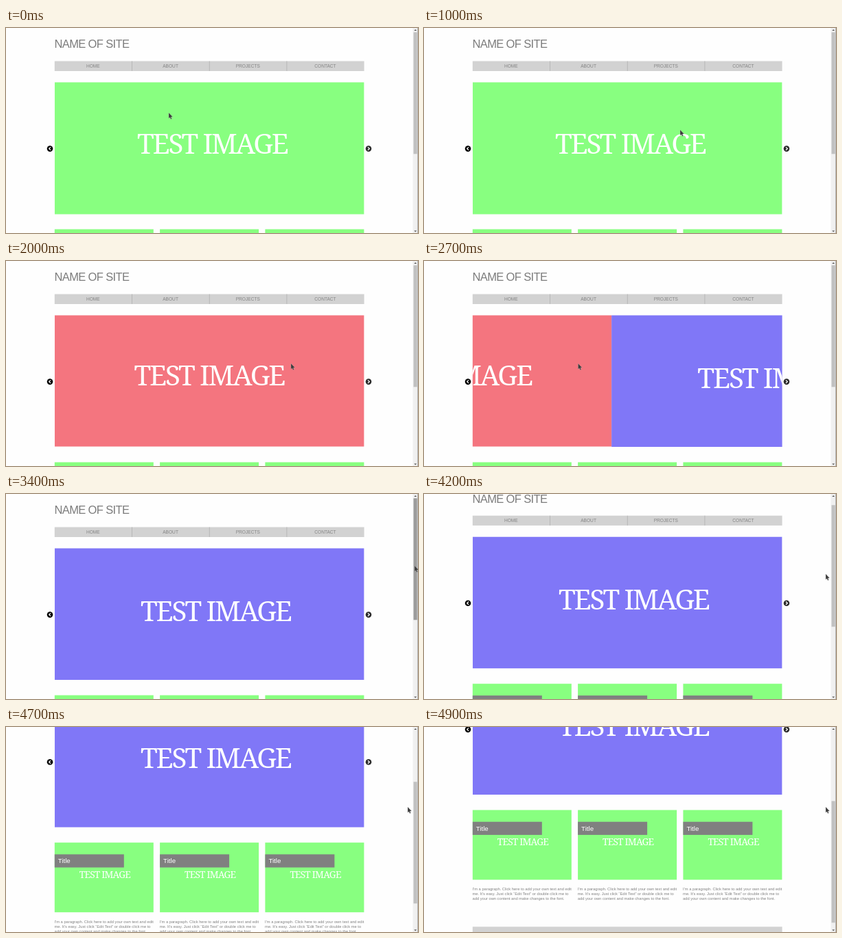
Recreate the animation shown at these times as an HTML page with a canvas. Size 600 by 300 pixels, loop 5000 ms.

```html
<!DOCTYPE html>
<html lang="en">
<head>
<meta charset="utf-8">
<title>Site mockup</title>
<style>
html, body { margin: 0; width: 600px; height: 300px; overflow: hidden; background: #fefefe; }
canvas { display: block; }
</style>
</head>
<body>
<canvas id="stage" width="600" height="300"></canvas>
<script>
const ctx = document.getElementById('stage').getContext('2d');
const LOOP = 5000, STEP = 100;
const SANS = '"Liberation Sans", Arial, sans-serif';
const SERIF = '"Noto Serif", serif';
const LEFT = 70.8, WIDTH = 450.8, TAB = WIDTH / 4;
const GREEN = '#88ff80', GREY = '#d2d2d2', INK = '#808080';

// dx, dy: where the lettering sits within the picture
const slides = [
  { color: GREEN, height: 193, dx: 0, dy: 0 },
  { color: '#f4757f', height: 192, dx: -4.5, dy: -2 },
  { color: '#8077f7', height: 192.5, dx: 5, dy: 1.5 }
];
const swipes = [1233, 2496], SWIPE = 383;
const paragraph = [
  'I\'m a paragraph. Click here to add your own text and edit',
  'me. It\'s easy. Just click “Edit Text” or double click me to',
  'add your own content and make changes to the font.'
];
// pointer gestures: when they begin and end, and where they lead
const home = { x: 237, y: 124 };
const gestures = [
  { from: 0, to: 200, x: 277, y: 134 },
  { from: 300, to: 600, x: 366, y: 146 },
  { from: 900, to: 1200, x: 394, y: 158 },
  { from: 1200, to: 1500, x: 154, y: 163 },
  { from: 1500, to: 2000, x: 415, y: 150 },
  { from: 2100, to: 2400, x: 472, y: 150 },
  { from: 2400, to: 2800, x: 182, y: 150 },
  { from: 2800, to: 3400, x: 595, y: 105 },
  { from: 3400, to: 3900, x: 585, y: 117 }
];

const clamp = v => Math.max(0, Math.min(1, v));
const swing = v => 0.5 - Math.cos(Math.PI * clamp(v)) / 2;

function pointerAt(t) {
  return gestures.reduce((p, g) => {
    const k = swing((t - g.from) / (g.to - g.from));
    return { x: p.x + (g.x - p.x) * k, y: p.y + (g.y - p.y) * k };
  }, home);
}

function box(x, y, w, h, color) {
  ctx.fillStyle = color;
  ctx.fillRect(x, y, w, h);
}

function label(str, x, y, font, color, align = 'left', spacing = 0) {
  ctx.font = font;
  ctx.letterSpacing = spacing + 'px';
  ctx.fillStyle = color;
  ctx.textAlign = align;
  ctx.fillText(str, x, y);
}

function shape(points, color) {
  ctx.beginPath();
  points.forEach(([x, y]) => ctx.lineTo(x, y));
  ctx.closePath();
  ctx.fillStyle = color;
  ctx.fill();
}

function picture(x, base, size) {
  const spacing = -0.053 * size;
  label('TEST IMAGE', x + spacing / 2, base, `${size}px ${SERIF}`, '#fff', 'center', spacing);
}

function header() {
  label('NAME OF SITE', 70.5, 29.4, `16.5px ${SANS}`, '#7c7c7c', 'left', -0.63);
  box(LEFT, 48.5, WIDTH, 14.5, GREY);
  ['HOME', 'ABOUT', 'PROJECTS', 'CONTACT'].forEach((name, i) => {
    if (i) box(LEFT + i * TAB - 0.4, 48.5, 0.8, 14.5, '#b0b0b0');
    label(name, LEFT + (i + 0.5) * TAB - 0.3, 58.3, `6.6px ${SANS}`, '#858585', 'center');
  });
}

function carousel(pos) {
  ctx.save();
  ctx.beginPath();
  ctx.rect(LEFT, 79, WIDTH, 195);
  ctx.clip();
  slides.forEach((s, i) => {
    const shift = (i - pos) * WIDTH;
    if (Math.abs(shift) >= WIDTH) return;
    box(LEFT + shift, 79.5, WIDTH, s.height, s.color);
    picture(301.5 + s.dx + shift, 184 + s.dy, 40.3);
  });
  ctx.restore();
}

function arrow(x, dir, color) {
  ctx.beginPath();
  ctx.arc(x, 176.6, 4.3, 0, 7);
  ctx.fillStyle = color;
  ctx.fill();
  ctx.beginPath();
  ctx.moveTo(x - dir, 174.4);
  ctx.lineTo(x + dir * 1.3, 176.6);
  ctx.lineTo(x - dir, 178.8);
  ctx.strokeStyle = '#fff';
  ctx.lineWidth = 1.3;
  ctx.stroke();
}

function card(x) {
  box(x, 294.5, 144, 102, GREEN);
  picture(x + 73.5, 346, 13.7);
  box(x, 311.7, 101, 19.2, INK);
  label('Title', x + 5, 324.8, `9.7px ${SANS}`, '#fff');
  paragraph.forEach((line, i) =>
    label(line, x - 0.3, 412.3 + i * 6.9, `5.75px ${SANS}`, INK));
}

function scrollbar(scroll, hover) {
  box(592.5, 0, 7.5, 300, '#f0f0f0');
  box(593.5, 6.3 + scroll * 0.59, 5.2, 178, hover ? '#9c9c9c' : '#c1c1c1');
  shape([[594.3, 4], [596.2, 2], [598.1, 4]], '#555');
  shape([[594.3, 296.5], [596.2, 298.5], [598.1, 296.5]], '#555');
  box(599.3, 0, 0.7, 300, '#999');
}

function pointer({ x, y }) {
  const tip = [[0, 0], [0, 8.2], [1.8, 6.8], [3, 9.6], [4.4, 9], [3.3, 6.3], [5.6, 6]];
  shape(tip.map(([a, b]) => [x + a, y + b]), '#3c3c3c');
  ctx.strokeStyle = 'rgba(200,200,200,.5)';
  ctx.lineWidth = 0.5;
  ctx.stroke();
}

function draw(t) {
  const pos = swipes.reduce((sum, start) => sum + swing((t - start) / SWIPE), 0);
  const scroll = 173 * Math.pow(clamp((t - 4100) / 800), 1.12);
  box(0, 0, 600, 300, '#fefefe');
  ctx.save();
  ctx.translate(0, -scroll);
  header();
  carousel(pos);
  arrow(64, -1, '#000');
  arrow(528, 1, '#2c2c2c');
  for (let i = 0; i < 3; i++) card(LEFT + i * 153.3);
  box(LEFT, 465.3, WIDTH, 60, GREY);
  ctx.restore();
  scrollbar(scroll, t >= 3400 && t < 3900);
  pointer(pointerAt(t));
}

function tick() {
  const t = performance.now() % LOOP;
  draw(Math.floor(t / STEP) * STEP);
  requestAnimationFrame(tick);
}
tick();
</script>
</body>
</html>
```
